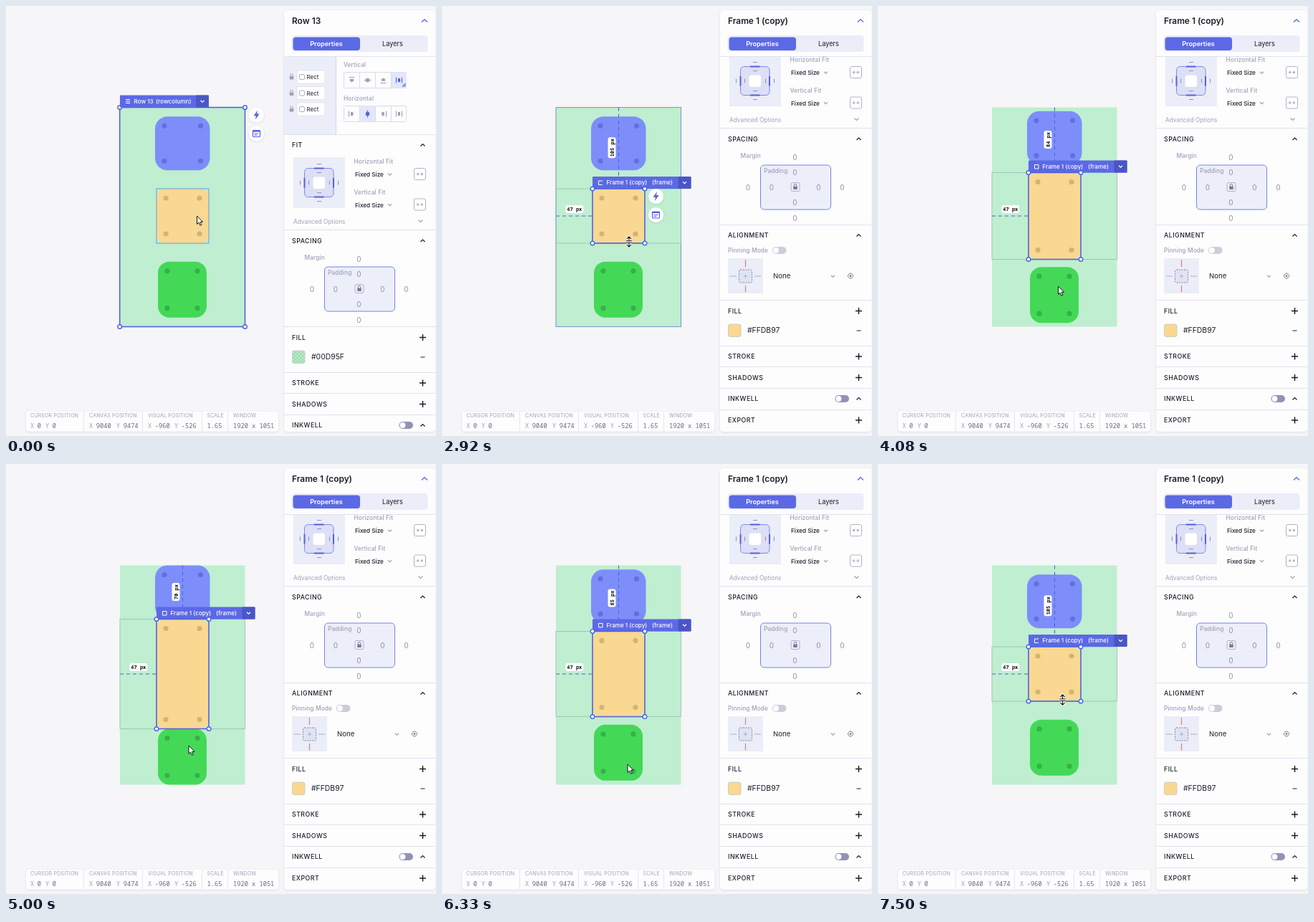
Animation, 600 px wide and 600 px high, one loop 8 s. Source, as an HTML page:

```html
<!DOCTYPE html>
<html lang="en">
<head>
<meta charset="utf-8">
<title>Layout editor</title>
<style>
  html, body { margin: 0; width: 100%; height: 100%; overflow: hidden; background: #f6f5f7; }
  svg { display: block; width: 100vw; height: 100vh; }
  text { font-family: Inter, sans-serif; white-space: pre; }
  .mono { font-family: "Noto Sans Mono", monospace; }
</style>
</head>
<body>
<svg id="stage" viewBox="0 0 600 600" xmlns="http://www.w3.org/2000/svg"></svg>
<script>
const LOOP = 8000, FPS = 12;
const SELECT = 1500, DRAG = 3250;
const BLUE = '#5561dc', GRAY = '#9ea0b8', INK = '#1d1d2b', LINE = '#dfe1ef', PALE = '#ebedf8';

// Drawing helpers
const rect = (x, y, w, h, fill, r = 0, extra = '') =>
  `<rect x="${x}" y="${y}" width="${w}" height="${h}" rx="${r}" fill="${fill}" ${extra}/>`;
const path = (d, stroke, w = 1, extra = '') =>
  `<path d="${d}" fill="none" stroke="${stroke}" stroke-width="${w}" ${extra}/>`;
const dot = (x, y, r, fill, extra = '') => `<circle cx="${x}" cy="${y}" r="${r}" fill="${fill}" ${extra}/>`;
const text = (s, x, y, size, fill, weight = 400, extra = '') =>
  `<text x="${x}" y="${y}" font-size="${size}" fill="${fill}" font-weight="${weight}" ${extra}>${s}</text>`;
const group = (body, x, y, extra = '') => `<g transform="translate(${x} ${y})" ${extra}>${body}</g>`;
const stroke = (color, w = 1) => `stroke="${color}" stroke-width="${w}"`;
const caption = (s, x, y) => text(s, x, y, 8.4, GRAY, 500, 'letter-spacing=".1"');
const chevron = (x, y, up, color = INK, s = 3) =>
  path(`M${x - s} ${y + (up ? s : -s) / 2}l${s} ${up ? -s : s}l${s} ${up ? s : -s}`, color, 1.2);
const rule = y => path(`M388 ${y}H599`, LINE);
const heading = (s, y) => text(s, 399, y + 3.2, 8.8, INK, 500, 'letter-spacing=".5"');
const plus = y => path(`M577 ${y}h9M581.5 ${y - 4.5}v9`, INK, 1.5);
const padlock = (x, y, color) =>
  rect(x - 2.8, y - 1, 5.6, 4.6, color, 0.8) + path(`M${x - 1.8} ${y - 1}v-1.2a1.8 1.8 0 0 1 3.6 0v1.2`, color, 1);
const toggle = (x, y, fill) => rect(x, y - 5, 19.5, 10, fill, 5) + dot(x + 5, y, 3.9, '#fff');

// Panel parts
function alignIcons(y, cx, upright, active) {
  return [0, 1, 2, 3].map(i => {
    const color = i === active ? BLUE : GRAY;
    const bars = ['M-4-4v8M-1 0h4', 'M0-5v10M-3 0h6', 'M4-4v8M-3 0h4', 'M-4-4v8M4-4v8M-2 0h4'][i];
    const block = rect([-1.5, -2.3, -2, -1.5][i], -2.6, [3.2, 4.6, 3.2, 3][i], 5.2, color);
    const turn = upright && i < 3 ? 'transform="rotate(90)"' : '';
    return group(`<g ${turn}>${path(bars, color, 1.1)}${block}</g>`, cx + i * 22, y);
  }).join('');
}

function alignGroup(y, upright, active) {
  return rect(471.5, y, 87, 22, '#fdfdfe', 1, stroke('#d9dbe9')) +
    rect(471.5 + active * 22, y, 21.5, 22, '#e4e7fa') +
    path(`M493.5 ${y}v22M515.5 ${y}v22M537.5 ${y}v22`, '#d9dbe9') +
    alignIcons(y + 11, 482.5, upright, active);
}

function childList() {
  const chip = y => padlock(398.5, y, GRAY) + rect(406, y - 9, 39, 18, '#fff', 2, stroke('#dcdeea', 0.7)) +
    rect(409.5, y - 3.5, 7, 7, '#fff', 1.5, stroke('#9a9bb0', 0.8)) + text('Rect', 419.5, y + 3, 8, INK);
  return rect(388, 70, 72.5, 109, PALE) + path('M460.5 70V179', '#d0d3e6') +
    [99, 121.5, 144].map(chip).join('') +
    caption('Vertical', 471, 85) + alignGroup(92.5, true, 3) + path('M553 112h4v-4z', BLUE, 1, `fill="${BLUE}"`) +
    caption('Horizontal', 471, 132) + alignGroup(139.5, false, 1) + rule(179.5);
}

function fitRow(title, y) {
  return caption(title, 485.5, y) + text('Fixed Size', 487, y + 18, 8.2, INK, 500) +
    chevron(535.5, y + 15, false, GRAY, 2.5) +
    rect(569.5, y + 6.5, 16, 16, '#fff', 2, stroke('#a9abc0', 0.9)) +
    path(`M573.5 ${y + 14.5}h3m2 0h3M575.5 ${y + 12.5}l-2 2 2 2M579.5 ${y + 12.5}l2 2-2 2`, '#8f92ad', 0.9);
}

function fitAndSpacing() {
  const ticks = 'M434-26h6M434-14h6M434 14h6M434 26h6M410.5-3v6M422.5-3v6M451.5-3v6M463.5-3v6';
  const zero = (x, y) => text('0', x, y + 3.6, 10, '#8d90ab', 400, 'text-anchor="middle"');
  const zeros = [[492.5, 353], [492.5, 374], [492.5, 416], [492.5, 438],
    [427, 395], [460, 395], [525.5, 395], [558.5, 395]];
  return heading('FIT', 194) + chevron(581.5, 194, true) +
    rect(401, 211, 72, 71, PALE) +
    rect(416.5, 226.5, 40.5, 40, '#dcdff5', 5, stroke('#7d88e4')) +
    rect(428.5, 238.5, 16.5, 16.5, '#fff', 3) +
    group(path(ticks, '#8f92b0', 1), 0, 246.5) +
    path('M430 226.5h13.5M430 266.5h13.5M416.5 240v13.5M457 240v13.5', BLUE, 2) +
    fitRow('Horizontal Fit', 220) + fitRow('Vertical Fit', 262.5) +
    text('Advanced Options', 401, 303.5, 8.3, GRAY) + chevron(578.5, 300, false, GRAY) + rule(312.5) +
    heading('SPACING', 327.5) + chevron(581.5, 327.5, true) +
    caption('Margin', 416.5, 353.5) +
    rect(444.5, 364, 98, 62, '#eceffa', 5, stroke('#7782df')) +
    caption('Padding', 449, 374.5) + zeros.map(p => zero(...p)).join('') +
    rect(487, 388.5, 12, 12, 'none', 2, stroke('#a9abc0', 0.9)) + padlock(493, 394.5, '#777a98') + rule(447.5);
}

function alignment() {
  return heading('ALIGNMENT', 320) + chevron(581.5, 320, true) +
    caption('Pinning Mode', 399, 343.5) + toggle(461, 341, '#cccdd8') +
    rect(399, 352, 49, 49, PALE) +
    rect(414.5, 368, 18, 18, '#e0e3f3', 2, stroke('#777b99', 0.9) + ' stroke-dasharray="2 1.5"') +
    path('M421 377h5M423.5 374.5v5M402 377h9M436 377h9', '#a4a7be', 0.9) +
    path('M423.5 354v10M423.5 390v9.5', '#d4897a', 1.2) +
    text('None', 462, 380, 9.6, INK) + chevron(545.5, 377, false, GRAY, 2.5) +
    dot(570, 376.5, 3.4, 'none', stroke('#85889f', 0.9)) + dot(570, 376.5, 1.5, '#85889f') +
    path('M565.5 376.5h1.2M573.3 376.5h1.2M570 372v1.2M570 379.8v1.2', '#85889f', 0.9);
}

function paint(hex, swatch) {
  return rule(447.5) + heading('FILL', 462.5) + plus(462.5) + swatch +
    text(hex, 426, 493.3, 10.4, INK) + path('M578.5 490h6', INK, 1.1) + rule(511.5) +
    heading('STROKE', 526) + plus(526) + rule(540.5) +
    heading('SHADOWS', 555.5) + plus(555.5) + rule(570.5) +
    heading('INKWELL', 585) + toggle(548.5, 585, '#9093b4') + chevron(581.5, 585, true) + rule(600.5) +
    heading('EXPORT', 615) + plus(615);
}

const swatch = fill => rect(399.5, 481, 17.5, 17.5, fill, 2.5, stroke('#c9c9c4', 0.9));

function status() {
  const head = (s, x) => text(s, x, 574, 6.9, GRAY, 400, 'letter-spacing=".25"');
  const mono = (s, x, fill = '#666a80') => text(s, x, 589, 8.7, fill, 400, 'class="mono"');
  const pair = (x, a, y, b) => mono('X', x, GRAY) + mono(a, x + 9.8) + mono('Y', y, GRAY) + mono(b, y + 9.8);
  return rect(28, 566, 352, 27.5, '#fdfdfe', 4, 'filter="url(#soft)"') +
    path('M108.5 566v27.5M190.5 566v27.5M273.5 566v27.5M309.5 566v27.5', '#e6e7ef') +
    head('CURSOR POSITION', 34) + head('CANVAS POSITION', 116) + head('VISUAL POSITION', 198) +
    head('SCALE', 280.5) + head('WINDOW', 317) +
    pair(34, '0', 55, '0') + pair(116, '9040', 154, '9474') + pair(198, '-960', 235, '-526') +
    mono('1.65', 280.5) + mono('1920 x 1051', 317);
}

function panel(title, body) {
  return rect(388, 6, 211.5, 588, '#fdfdfe', 5, 'filter="url(#soft)"') +
    text(title, 399, 24.6, 11.9, INK, 600) + chevron(584, 20.5, true, BLUE, 4) +
    rect(398.5, 41, 190, 23, PALE, 4) + rect(400.5, 43.5, 93.5, 18.5, '#5c69e5', 4) +
    text('Properties', 447, 56, 9.1, '#fff', 600, 'text-anchor="middle"') +
    text('Layers', 539.5, 56, 9.2, INK, 400, 'text-anchor="middle"') +
    `<g clip-path="url(#scroll)">${body}</g>` + rule(70.5);
}

// Canvas parts
const ROW = { x: 159, y: 141.5, w: 174.5, h: 306 };
const BASE = 76, FULL = 153, TOP_H = 75, LOW_H = 78, MID = 293;

function card(x, y, w, h, r, inset, fill, spot) {
  const xs = [x + inset, x + w - inset], ys = [y + inset, y + h - inset];
  return rect(x, y, w, h, fill, r) + xs.flatMap(a => ys.map(b => dot(a, b, 3.6, spot))).join('');
}

function selection(x, y, w, h) {
  const spots = [[x, y], [x + w, y], [x, y + h], [x + w, y + h]];
  return rect(x, y, w, h, 'none', 0, stroke(BLUE, 1.6)) +
    spots.map(([a, b]) => dot(a, b, 2.8, '#fff', stroke(BLUE, 1.4))).join('');
}

function tag(x, y, w, icon, name, kind, gap) {
  return group(rect(0, -17, w, 17, '#5c69e5', 1) + rect(w - 18, -17, 18, 17, '#4b56c6', 1) +
    path(icon, '#fff', 1) + text(name, 19.5, -5.6, 8.1, '#fff', 500) +
    text(kind, gap, -5.6, 8.2, '#fff', 500) + chevron(w - 9, -8.5, false, '#fff', 2.5), x, y);
}

function quickActions(x, y) {
  const disc = cy => dot(x, cy, 10.5, '#fff', 'filter="url(#soft)"');
  return disc(y + 10.5) + disc(y + 36.5) +
    group(`<path d="M1.5-6.5L-4 1.2H-.6L-1.5 6.5 4-1.4H.6Z" fill="${BLUE}"/>`, x, y + 10.5) +
    group(rect(-5, -4.5, 10, 9, 'none', 1, stroke(BLUE, 1.2)) +
      path('M-5-3.4H5', BLUE, 2) + path('M-3 0h6M-3 2.2h4', BLUE, 1), x, y + 36.5);
}

function measure(label, x, y, turn) {
  const w = label.length * 4.2 + 4;
  return `<g transform="translate(${x} ${y}) rotate(${turn})">` + rect(-w / 2, -5.5, w, 11, '#fff', 3) +
    text(label, 0, 2.6, 7, '#111', 700, 'class="mono" text-anchor="middle"') + '</g>';
}

function pointer(x, y, resize) {
  if (!resize) {
    return group('<path d="M0 0V11.4L2.6 9 4.4 13.2 6.3 12.4 4.6 8.3H8.1Z" fill="#fff" stroke="#111" stroke-width="1"/>', x, y);
  }
  const d = 'M-3-4.2L0-7.2 3-4.2M-3 4.2L0 7.2 3 4.2M0-6.5V-1.5M0 6.5V1.5M-4-1.3H4M-4 1.3H4';
  return group(path(d, '#fff', 2.8) + path(d, '#111', 1.1), x, y);
}

// Pointer path: time, x, y
const TRACK = [
  [1850, 266.5, 293], [2330, 259.5, 338], [2500, 259.5, 341], [2583, 260, 344], [2700, 260, 344],
  [2916, 261, 329], [3500, 258, 329], [3916, 251, 374], [4083, 251.5, 391], [4550, 254, 474],
  [4833, 255, 425], [5000, 255, 393], [5170, 256, 375], [5500, 257, 452], [5667, 257, 452],
  [5950, 258, 350], [6166, 259, 372], [6333, 259, 419], [6550, 259, 444], [7330, 257.5, 329]
];

function pointerAt(t) {
  const i = TRACK.findIndex(k => k[0] > t);
  if (i === 0) return TRACK[0].slice(1);
  if (i < 0) return TRACK[TRACK.length - 1].slice(1);
  const [a, b] = [TRACK[i - 1], TRACK[i]];
  const p = (t - a[0]) / (b[0] - a[0]);
  return [a[1] + (b[1] - a[1]) * p, a[2] + (b[2] - a[2]) * p];
}

// The dragged box trails the pointer and stops when the column is full.
function boxHeight(t) {
  if (t < DRAG) return BASE;
  const pull = pointerAt(t - 167)[1] - 329;
  return Math.min(FULL, Math.max(BASE, BASE + pull));
}

function canvasView(t) {
  const h = boxHeight(t), top = MID - h / 2, picked = t >= SELECT;
  const gap = (ROW.h - TOP_H - LOW_H - h) / 6;
  const [px, py] = pointerAt(t);
  const resize = (t >= 2830 && t < 3580) || t >= 7400;
  let s = rect(ROW.x, ROW.y, ROW.w, ROW.h, '#bfeed0') +
    card(208, ROW.y + gap, 76.5, TOP_H, 17, 13, '#7d8efb', '#6170dd') +
    card(210, top, 73, h, 13, 13, '#f9d891', '#d2b475') +
    card(212, ROW.y + ROW.h - gap - LOW_H, 68, LOW_H, 16, 13, '#43d957', '#35b148');
  if (!picked) {
    s += rect(210, top, 73, h, 'none', 0, stroke('#7796d2', 1)) +
      selection(ROW.x - 0.3, ROW.y, ROW.w + 0.3, ROW.h) +
      tag(159, 141.5, 124, 'M8-11h6M8-8.5h6M8-6h6', 'Row 13', '(rowcolumn)', 50) +
      quickActions(349.5, 141.5);
    return s + pointer(px, py, false);
  }
  if (py > 331 && t < DRAG || t >= 2330 && t < DRAG) {
    s += rect(ROW.x, ROW.y, ROW.w, ROW.h, 'none', 0, stroke('#7796d2', 1));
  }
  const icon = h < 80 ? 'M14-11H8.5v5.5H14' : 'M8.5-11h5.5v5.5H8.5z';
  s += rect(ROW.x, top, ROW.w, h, 'none', 0, stroke('#96bfb2', 0.8)) +
    path(`M246.5 ${ROW.y}V${top}M${ROW.x} ${MID}H210`, BLUE, 1.1, 'stroke-dasharray="5 4"') +
    measure('47 px', 184.8, 283.5, 0) +
    measure(`${Math.round((top - 141) / 1.086)} px`, 237, (ROW.y + top) / 2 - 0.5, -90) +
    tag(210, top, 137.5, icon, 'Frame 1 (copy)', '(frame)', 83) +
    selection(210, top, 73, h);
  if (t < DRAG) s += quickActions(298.5, top);
  return s + pointer(px, py, resize);
}

// Scene
const fills = {
  row: swatch('url(#check)'),
  frame: swatch('#fad891')
};
document.getElementById('stage').innerHTML = `
  <defs>
    <filter id="soft" x="-20%" y="-20%" width="140%" height="150%">
      <feDropShadow dx="0" dy="1" stdDeviation="1.5" flood-color="#55587a" flood-opacity=".16"/>
    </filter>
    <clipPath id="scroll"><rect x="388" y="70" width="211.5" height="524" rx="4"/></clipPath>
    <pattern id="check" width="5" height="5" patternUnits="userSpaceOnUse">
      <path d="M0 0h5v5h-5z" fill="#bdebcd"/><path d="M0 0h2.5v2.5h-2.5zM2.5 2.5h2.5v2.5h-2.5z" fill="#9bd9b2"/>
    </pattern>
  </defs>
  ${rect(0, 0, 600, 600, '#f6f5f7')}
  <g id="canvas"></g>
  ${status()}
  <g id="rowPanel">${panel('Row 13', childList() + fitAndSpacing() + paint('#00D95F', fills.row))}</g>
  <g id="framePanel">${panel('Frame 1 (copy)',
    group(fitAndSpacing(), 0, -142) + alignment() + group(paint('#FFDB97', fills.frame), 0, -37))}</g>`;

const canvas = document.getElementById('canvas');
const rowPanel = document.getElementById('rowPanel');
const framePanel = document.getElementById('framePanel');
const start = performance.now();
let shown = -1;

function draw() {
  const t = (performance.now() - start) % LOOP;
  const step = Math.floor((t + 4) * FPS / 1000);
  if (step !== shown) {
    shown = step;
    const now = (step * 1000 / FPS) % LOOP;
    canvas.innerHTML = canvasView(now);
    rowPanel.style.display = now < SELECT ? '' : 'none';
    framePanel.style.display = now < SELECT ? 'none' : '';
  }
  requestAnimationFrame(draw);
}
draw();
</script>
</body>
</html>
```
